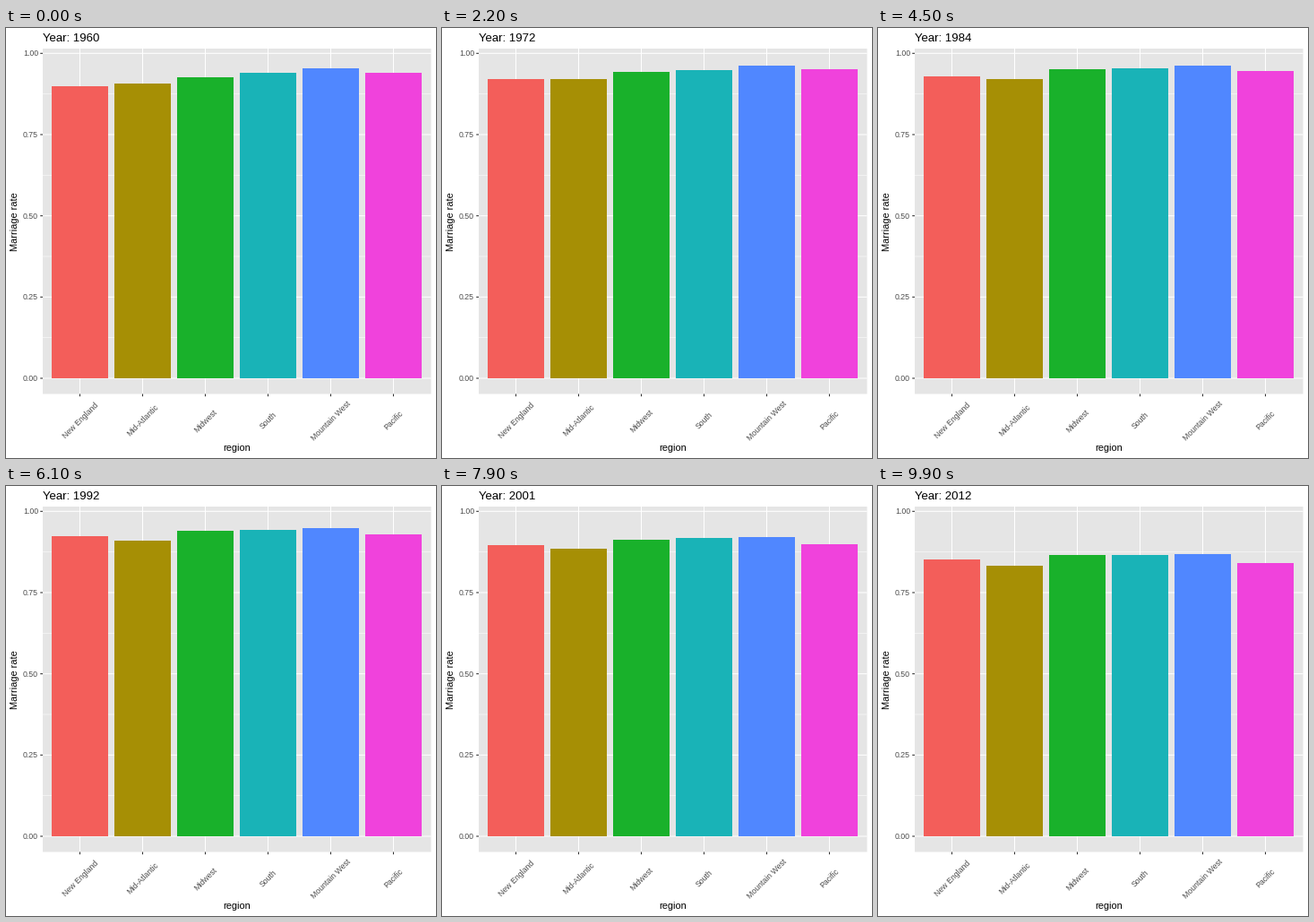
Write a matplotlib script that moves like this. It is 480 px wide and 480 px high and loops after 10 s.

```python
import numpy as np
import matplotlib.pyplot as plt
from matplotlib.animation import FuncAnimation
from matplotlib.patches import Rectangle

SIZE, DPI = 480, 80
FRAMES, INTERVAL = 100, 100
FIRST, LAST = 1960, 2012
PT = 72 / DPI  # one pixel in points

LEFT, RIGHT, TOP, BOTTOM = 41, 474.5, 23, 408.5
ZERO, UNIT = 391, 362.7
BAR_W, STEP, BAR_X = 63, 70, 51

REGIONS = ["New England", "Mid-Atlantic", "Midwest",
           "South", "Mountain West", "Pacific"]
COLORS = ["#F35E5A", "#A68F05", "#19B12B", "#19B3B7", "#5087FF", "#F042DC"]

# Bar tops in pixels, one row per survey year, one column per region
CENSUS = np.array([
    [65.0, 62.0, 55.0, 50.0, 45.0, 50.0],    # 1960
    [57.8, 57.4, 49.6, 47.6, 42.6, 46.0],    # 1970
    [54.6, 56.0, 45.4, 44.2, 41.0, 46.4],    # 1980
    [53.5, 58.4, 47.75, 47.2, 44.8, 51.75],  # 1990
    [65.0, 69.0, 59.0, 56.0, 56.0, 64.2],    # 2000
])
TOPS_2005 = np.array([69.0, 75.0, 65.0, 64.0, 61.0, 71.0])
TOPS_2012 = np.array([82.0, 89.0, 77.0, 77.0, 76.0, 85.6])
# Share of the way to 2005 and then to 2012, reached in each year
EARLY = [0.08, 0.3, 0.55, 0.8, 1.0]
LATE = [0.4, 0.57, 0.62, 0.71, 0.83, 0.97, 1.0]

tops = np.vstack([
    CENSUS,
    [CENSUS[-1] + s * (TOPS_2005 - CENSUS[-1]) for s in EARLY],
    [TOPS_2005 + s * (TOPS_2012 - TOPS_2005) for s in LATE],
])
years = np.array([1960, 1970, 1980, 1990] + list(range(2000, 2013)))
keys = np.round((years - FIRST) / (LAST - FIRST) * (FRAMES - 1))

plt.rcParams["font.family"] = "Liberation Sans"
fig = plt.figure(figsize=(SIZE / DPI, SIZE / DPI), dpi=DPI, facecolor="white")
ax = fig.add_axes([0, 0, 1, 1])
ax.set_xlim(0, SIZE)
ax.set_ylim(SIZE, 0)
ax.axis("off")


def line(xs, ys, color="white", width=1.07, z=1):
    ax.plot(xs, ys, color=color, lw=width * PT, zorder=z,
            solid_capstyle="butt", snap=False)


def label(x, y, text, size, color="black", ha="center", angle=0):
    return ax.text(x, y, text, fontsize=size * PT, color=color, ha=ha,
                   va="baseline", rotation=angle, rotation_mode="anchor")


ax.add_patch(Rectangle((LEFT, TOP), RIGHT - LEFT, BOTTOM - TOP,
                       fc="#E5E5E5", lw=0, zorder=0, snap=False))

for k in range(4):
    y = ZERO - UNIT * (k + 0.5) / 4
    line([LEFT, RIGHT], [y, y], width=0.53)
for k in range(5):
    y = ZERO - UNIT * k / 4
    line([LEFT, RIGHT], [y, y])
    line([LEFT - 2.75, LEFT], [y, y], "#333333")
    label(36, y + 3.15, f"{k / 4:.2f}", 8.8, "#4D4D4D", "right")

bars = []
for k, (name, color) in enumerate(zip(REGIONS, COLORS)):
    x = BAR_X + STEP * k
    mid = x + BAR_W / 2
    line([mid, mid], [TOP, BOTTOM])
    line([mid, mid], [BOTTOM, BOTTOM + 2.75], "#333333")
    label(mid + 2.2, 440.2, name, 8.8, "#4D4D4D", angle=45)
    bar = Rectangle((x, ZERO), BAR_W, 0, fc=color, lw=0,
                    antialiased=False, zorder=3)
    bars.append(ax.add_patch(bar))

label((LEFT + RIGHT) / 2, 472, "region", 11)
label(13.5, (TOP + BOTTOM) / 2, "Marriage rate", 11, angle=90)
title = label(LEFT, 15, "", 13.2, ha="left")


def update(i):
    year = round(FIRST + (LAST - FIRST) * i / (FRAMES - 1))
    title.set_text(f"Year: {year}")
    for k, bar in enumerate(bars):
        top = np.floor(np.interp(i, keys, tops[:, k]) + 0.5)
        bar.set_y(top)
        bar.set_height(ZERO - top)
    return [title, *bars]


anim = FuncAnimation(fig, update, frames=FRAMES, interval=INTERVAL,
                     repeat=True, repeat_delay=0, blit=False)
plt.show()
```
